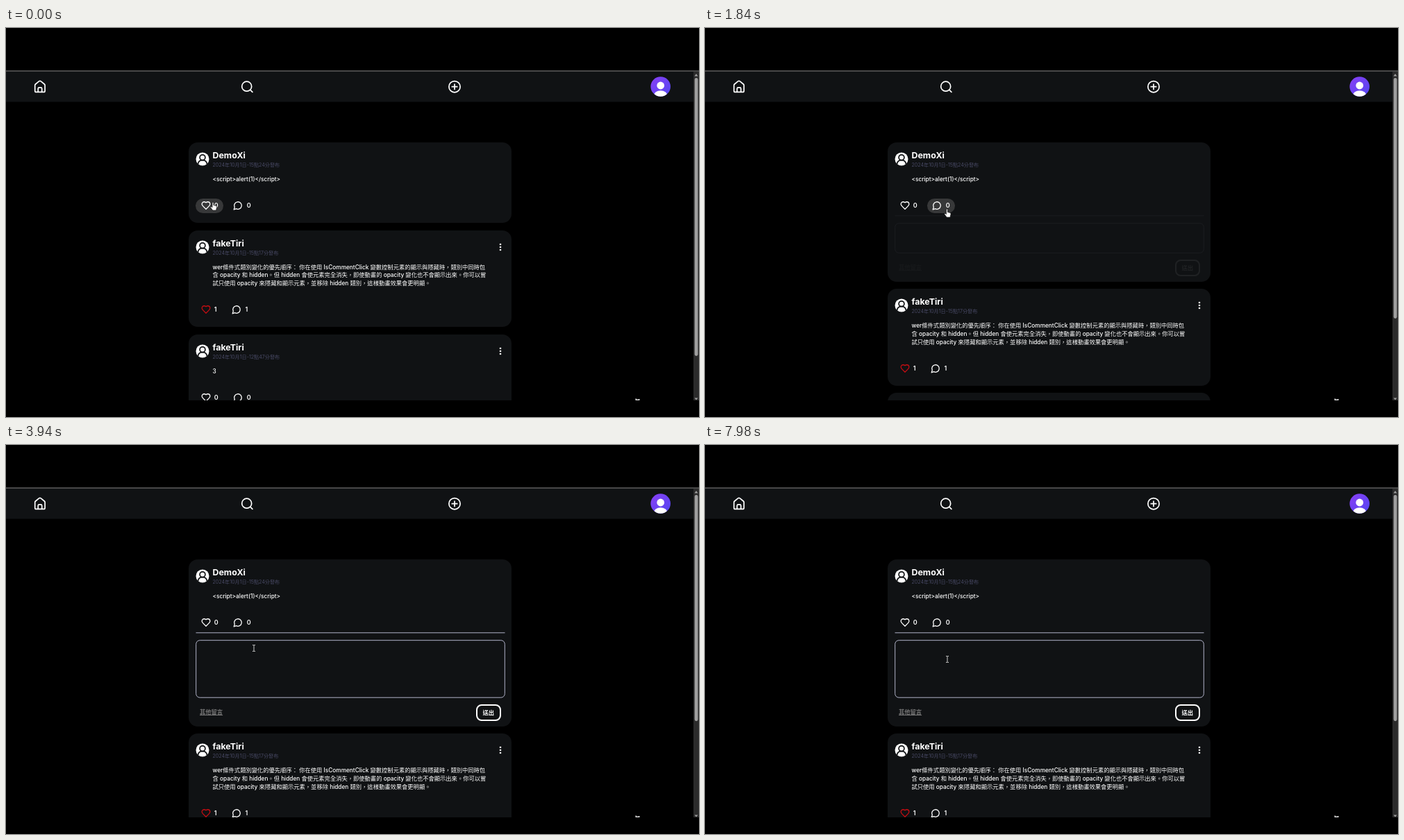
Animation of 998 by 561 pixels, one loop 8000 ms. Source, as an HTML page:

```html
<!DOCTYPE html>
<html lang="zh-Hant">
<head>
<meta charset="utf-8">
<style>
html, body { margin: 0; width: 100%; height: 100%; overflow: hidden; background: #000; }
body { font: 500 8.29px/11.75px Inter, "Noto Sans CJK TC", "Noto Sans CJK", sans-serif; color: #fff; cursor: default; }
#stage { position: absolute; left: 0; top: 0; width: 998px; height: 537px; overflow: hidden; }
#stage > svg { position: absolute; left: 0; top: 0; }
.outline { fill: none; stroke: #fff; stroke-linecap: round; stroke-linejoin: round; }
#feed { position: absolute; left: 262.5px; top: 165px; width: 465.5px; }
.card { position: relative; margin-bottom: 10.6px; border-radius: 13px; background: #101214; }
.card > * { position: absolute; }
.face { left: 10px; top: 14px; }
.name { left: 35px; top: 11px; font-size: 12.4px; line-height: 16px; font-weight: 700; }
.date { left: 35px; top: 27px; font-size: 7.1px; font-weight: 400; color: #494a66; white-space: nowrap; }
.text { left: 35px; top: 48px; white-space: pre; }
.menu { left: 446px; top: 18px; }
.actions { left: 10.5px; top: 81px; display: flex; gap: 7px; }
.tall .actions { top: 104.5px; }
.pill { display: flex; align-items: center; height: 20.5px; padding: 0 7.2px 0 7.5px; border-radius: 11px; font-size: 9px; font-weight: 600; }
.pill svg { width: 14px; height: 14px; margin-right: 5.3px; }
.pill.hover { background: #373839; }
.liked .outline { stroke: #c40d12; }
#panel { left: 0; top: 0; width: 100%; }
#panel svg { position: absolute; left: 0; top: 0; overflow: visible; }
#row { position: absolute; left: 16.5px; right: 15px; display: flex; justify-content: space-between; align-items: center; }
.others { color: #777; font-weight: 600; text-decoration: underline; }
.send { box-sizing: border-box; width: 36.5px; height: 24.5px; border: 2px solid #fff; border-radius: 8px; line-height: 20.5px; text-align: center; font-weight: 700; }
</style>
</head>
<body>
<div id="stage">
  <svg width="998" height="561">
    <path fill="#484848" d="M0 61h998v2H0z"/>
    <path fill="#101214" d="M0 63h990v43.5H0z"/>
    <g class="outline" stroke-width="1.7">
      <path d="M41.700 82.700q0-1 .8-1.700l5-4.100q1.400-1 2.800 0l5 4.100q.8.700.8 1.700v8q0 1.700-1.700 1.700h-11q-1.700 0-1.700-1.700zM46.200 92.200v-4.800q0-1.500 1.500-1.500h2.500q1.500 0 1.500 1.500v4.800"/>
      <circle cx="346.700" cy="84.200" r="7"/><path d="M351.900 89.400l3 3"/>
      <circle cx="646" cy="84.700" r="8.100"/><path d="M646 81v7.400M642.300 84.700h7.400"/>
    </g>
    <defs>
      <linearGradient id="violet" x2="1" y2="1"><stop stop-color="#8a3ff5"/><stop offset="1" stop-color="#4f46f0"/></linearGradient>
      <clipPath id="round"><circle cx="942.700" cy="84.500" r="14.300"/></clipPath>
    </defs>
    <g clip-path="url(#round)">
      <path fill="url(#violet)" d="M928 70h30v30h-30z"/>
      <circle cx="942.700" cy="83" r="5.400" fill="#fff"/><ellipse cx="942.700" cy="97" rx="9.700" ry="6.800" fill="#fff"/>
    </g>
    <path fill="#2b2b2b" d="M990 63h8v474h-8z"/>
    <path fill="#a0a0a0" d="M991.500 69.500h5l-2.500-3.500zM991.500 533.500h5l-2.500 3z"/>
    <rect id="thumb" x="991.700" y="72" width="4.800" rx="2.400" fill="#9f9f9f"/>
    <path fill="#ddd" d="M906.500 534.500h1.500v1h3v-.5h1.500v2h-6z"/>
  </svg>
  <div id="feed"></div>
  <svg width="998" height="561">
    <g id="pointer" stroke="#111" stroke-width=".7" stroke-linejoin="round">
      <path id="hand" fill="#fff" d="M-1 .700Q0-.700 1 .700V4.500L4.600 5.400Q6 5.900 5.600 7.600L4.600 12H-.300L-3.600 7.600Q-3.300 6-2 6.700L-1 7.600Z"/>
      <path id="beam" fill="none" stroke="#ccc" stroke-width="1" d="M-2-4.500h1.500l.5.500.5-.500H2M0-4v8M-2 4.500h1.500L0 4l.5.500H2"/>
      <path id="arrow" fill="#fff" d="M0 0v11l2.600-2.400 1.700 3.800 1.600-.7-1.700-3.700h3.500z"/>
    </g>
  </svg>
</div>
<script>
const $ = id => document.getElementById(id);

const icon = d => `<svg class="outline" viewBox="0 0 24 24" stroke-width="2.200"><path d="${d}"/></svg>`;
const heart = icon('M19 14c1.500-1.500 3-3.200 3-5.500A5.500 5.500 0 0 0 16.500 3c-1.800 0-3 .5-4.500 2-1.500-1.500-2.700-2-4.500-2A5.500 5.500 0 0 0 2 8.500c0 2.300 1.500 4 3 5.500l7 7z');
const bubble = icon('M7.900 20A9 9 0 1 0 4 16.100L2 22z');
const face = `<svg class="face" width="20" height="20" viewBox="-10 -10 20 20">
  <circle r="9.500" fill="#fff"/><g fill="none" stroke="#101214" stroke-width="1.700">
  <circle cy="-2.300" r="3.900"/><path d="M-6.300 6.800C-5.500 0 5.500 0 6.300 6.800"/></g></svg>`;
const menu = `<svg class="menu" width="6" height="12" fill="#fff">${
  [2, 6, 10].map(y => `<circle cx="3" cy="${y}" r="1.300"/>`).join('')}</svg>`;

const pill = (glyph, count, liked) =>
  `<div class="pill ${liked ? 'liked' : ''}">${glyph}<span>${count}</span></div>`;

function card({ name, date, text, likes, comments, own }) {
  const tall = text.includes('\n');
  return `<div class="card ${tall ? 'tall' : ''}" style="height:${tall ? 139.5 : 116}px">${face}
    <div class="name">${name}</div><div class="date">2024年10月1日-${date}分發布</div>
    <div class="text">${text.replace(/</g, '&lt;')}</div>${own ? menu : ''}
    <div class="actions">${pill(heart, likes, likes)}${pill(bubble, comments)}</div></div>`;
}

$('feed').innerHTML = [
  { name: 'DemoXi', date: '15點24', text: '<script>alert(1)<\/script>', likes: 0, comments: 0 },
  { name: 'fakeTiri', date: '15點17', likes: 1, comments: 1, own: true, text:
    'wer條件式類別變化的優先順序： 你在使用 IsCommentClick 變數控制元素的顯示與隱藏時，類別中同時包\n' +
    '含 opacity 和 hidden。但 hidden 會使元素完全消失，即使動畫的 opacity 變化也不會顯示出來。你可以嘗\n' +
    '試只使用 opacity 來隱藏和顯示元素，並移除 hidden 類別，這樣動畫效果會更明顯。' },
  { name: 'fakeTiri', date: '12點47', text: '3', likes: 0, comments: 0, own: true }
].map(card).join('');

const post = document.querySelector('.card');
const [likePill, commentPill] = post.querySelector('.actions').children;
post.insertAdjacentHTML('beforeend', `<div id="panel">
  <svg width="465" height="1" fill="none" stroke="#b0b2c8">
    <path d="M10.500 105.800h445"/><rect id="box" x="10.700" y="116.700" width="444.600" rx="5.500"/>
  </svg>
  <div id="row"><span class="others">其他留言</span><span class="send">送出</span></div></div>`);

// Pointer stops: time, x, y
const stops = [
  [0, 298, 251], [450, 298, 251], [900, 348, 261], [3000, 349, 261], [3500, 357, 293],
  [4700, 357, 293], [5200, 300, 251], [6900, 300, 251], [7400, 349, 309], [8000, 349, 309]
];
const OPEN = 1780, LIKE = 5400, UNLIKE = 6600;

function ease(t, from, to) {
  const p = Math.min(1, Math.max(0, (t - from) / (to - from)));
  return p * p * (3 - 2 * p);
}

function pointerAt(t) {
  const i = stops.findIndex(s => s[0] > t);
  const [a, b] = [stops[i - 1], stops[i]], p = ease(t, a[0], b[0]);
  return [1, 2].map(k => a[k] + (b[k] - a[k]) * p);
}

function render(t) {
  const open = t >= OPEN, shown = ease(t, OPEN, OPEN + 400);
  const boxHeight = 40 + 42.5 * shown;
  const extra = open ? 42 + boxHeight : 0;
  post.style.height = 116 + extra + 'px';
  $('panel').style.display = open ? '' : 'none';
  $('panel').style.opacity = shown;
  $('box').setAttribute('height', boxHeight);
  $('row').style.top = 126 + boxHeight + 'px';
  $('thumb').setAttribute('height', 217743 / (543 + extra));

  const liked = t >= LIKE && t < UNLIKE;
  likePill.classList.toggle('liked', liked);
  likePill.lastChild.textContent = +liked;

  const [x, y] = pointerAt(t);
  const onRow = y > 246 && y < 267;
  const onLike = onRow && x > 273 && x < 313, onComment = onRow && x > 320 && x < 360;
  likePill.classList.toggle('hover', onLike);
  commentPill.classList.toggle('hover', onComment);
  const shape = onLike || onComment ? 'hand' : open && y > 282 ? 'beam' : 'arrow';
  for (const id of ['hand', 'beam', 'arrow']) $(id).style.display = id === shape ? '' : 'none';
  $('pointer').setAttribute('transform', `translate(${x} ${y})`);
}

const start = performance.now();
function tick() {
  render((performance.now() - start) % 8000);
  requestAnimationFrame(tick);
}
tick();
</script>
</body>
</html>
```
